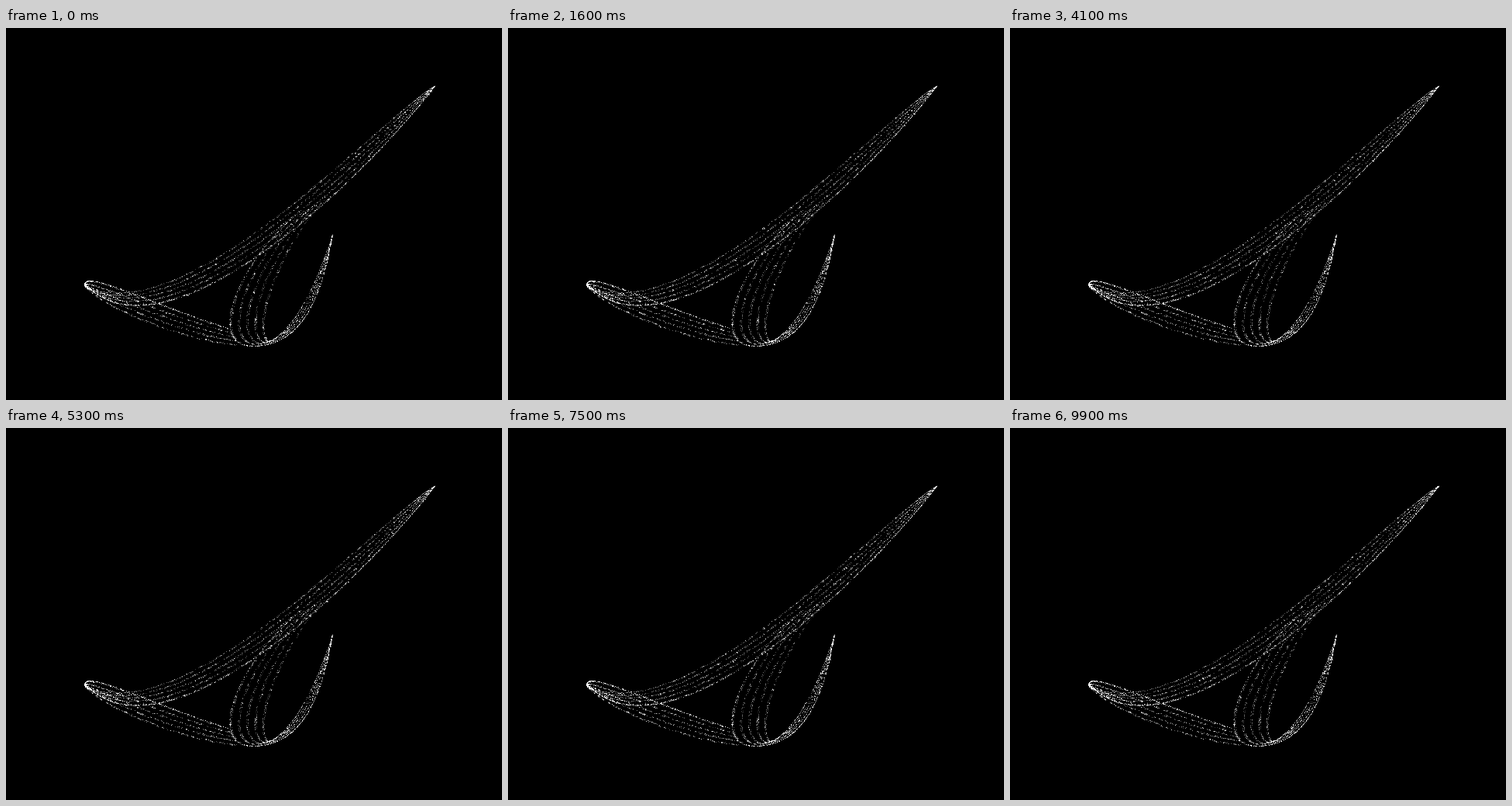
An HTML page with a canvas for the animation above (10 s loop, 640 by 480 pixels).

```html
<!DOCTYPE html>
<html lang="en">
<head>
<meta charset="utf-8">
<title>Attractor dust</title>
<style>
  html, body { margin: 0; width: 100%; height: 100%; overflow: hidden; background: #000; }
  canvas { display: block; }
</style>
</head>
<body>
<canvas id="stage" width="640" height="480"></canvas>
<script>
const ctx = document.getElementById('stage').getContext('2d');
const STEP = 100, STEPS = 100, SPARKS = 200;

function seeded(seed) {
  return () => {
    seed = (seed + 0x6D2B79F5) | 0;
    let t = Math.imul(seed ^ (seed >>> 15), 1 | seed);
    t = (t + Math.imul(t ^ (t >>> 7), 61 | t)) ^ t;
    return ((t ^ (t >>> 14)) >>> 0) / 4294967296;
  };
}

// Each ribbon spans two cubic Bezier edges; the first edge is the bright one.
const ribbons = [
  { name: 'sweep', light: 95,
    a: [553,74, 470,185, 210,440, 102,331],
    b: [553,74, 470,127, 240,385, 104,335] },
  { name: 'keel', light: 125,
    a: [102,334, 92,305, 200,362, 287,387],
    b: [102,331, 108,352, 220,403, 300,409] },
  { name: 'arm', light: 90,
    a: [375,240, 300,300, 256,410, 318,410],
    b: [410,222, 345,295, 320,390, 338,404] },
  { name: 'wing', light: 120,
    a: [318,410, 385,410, 408,340, 421,266],
    b: [338,404, 372,392, 404,320, 421,266] }
];

// Strands run in close pairs across a ribbon.
const strands = [];
for (let k = 0; k < 5; k++) strands.push(k * .24, k * .24 + .04);

const bezier = (p, axis, t) => {
  const s = 1 - t;
  return s * s * s * p[axis] + 3 * s * s * t * p[axis + 2]
       + 3 * s * t * t * p[axis + 4] + t * t * t * p[axis + 6];
};

const dots = [];
const base = document.createElement('canvas');
base.width = 640;
base.height = 480;

function scatter() {
  const rnd = seeded(71);
  const dust = base.getContext('2d');
  dust.fillRect(0, 0, 640, 480);
  dust.globalCompositeOperation = 'lighter';
  for (const { a, b, light } of ribbons) {
    for (const u of strands) {
      const path = a.map((v, i) => v + (b[i] - v) * u);
      const count = Math.hypot(path[6] - path[0], path[7] - path[1]) * (u ? .5 : 1.1);
      const glow = light * (u ? 1 : 1.4);
      for (let n = 0; n < count; n++) {
        const t = rnd();
        const [x, y] = [0, 1].map(axis => Math.round(bezier(path, axis, t) + (rnd() - .5) * .5));
        const g = Math.round(glow * (.35 + .95 * rnd()));
        dust.fillStyle = `rgb(${g},${g},${g})`;
        dust.fillRect(x, y, 1, 1);
        dots.push([x, y]);
      }
    }
  }
}

function draw(step) {
  const rnd = seeded(step * 7919 + 13);
  ctx.drawImage(base, 0, 0);
  for (let i = 0; i < SPARKS; i++) {
    const [x, y] = dots[Math.floor(rnd() * dots.length)];
    if (rnd() < .25) {
      ctx.fillStyle = 'rgba(255,255,255,.4)';
      ctx.fillRect(x, y, 2, 2);
    }
    ctx.fillStyle = `rgba(255,255,255,${.5 + rnd() / 2})`;
    ctx.fillRect(x, y, 1, 1);
  }
}

scatter();
const start = performance.now();
let shown = -1;
function tick() {
  const step = Math.floor((performance.now() - start) / STEP) % STEPS;
  if (step !== shown) draw(shown = step);
  requestAnimationFrame(tick);
}
tick();
</script>
</body>
</html>
```
